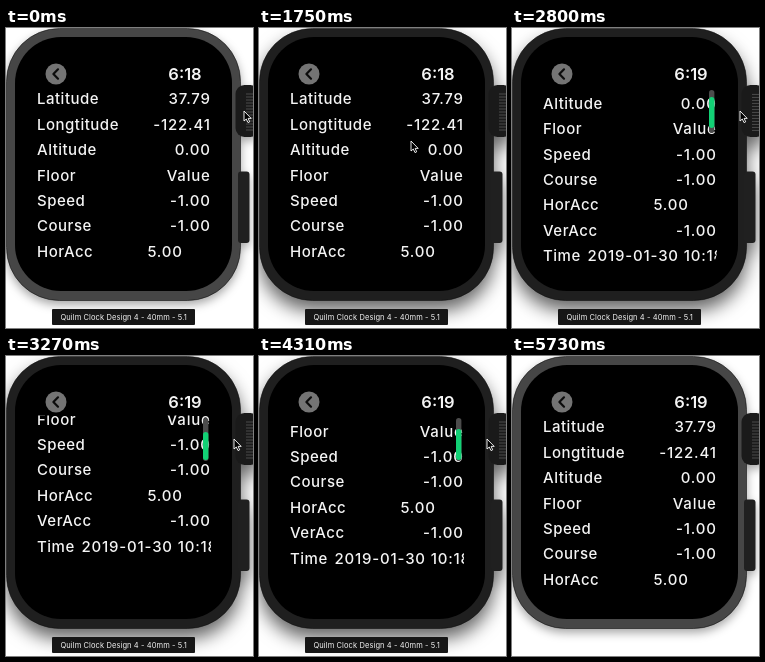
An HTML page that plays this animation: 247 by 300 pixels, repeating every 5.83 s.

```html
<!DOCTYPE html>
<html lang="en">
<head>
<meta charset="utf-8">
<title>Watch location list</title>
<style>
  html, body { margin: 0; width: 100%; height: 100%; overflow: hidden; background: #fff; }
  svg { display: block; width: 247px; height: 300px; font-family: Inter, Roboto, sans-serif; fill: #f4f4f4; }
  .rows { font-size: 15px; font-weight: 500; letter-spacing: .5px; }
  .value { letter-spacing: .8px; }
  .clock { font-size: 16.5px; font-weight: 600; }
  .tag { font-size: 7.5px; letter-spacing: .1px; }
  .end { text-anchor: end; }
  .body { --shell: #464646; filter: drop-shadow(0 4px 5px rgba(0, 0, 0, .35)); }
  .body.active { --shell: #1f1f1f; filter: drop-shadow(0 10px 9px rgba(0, 0, 0, .6)); }
  .shell { fill: var(--shell); stroke: #111; stroke-opacity: .6; }
</style>
</head>
<body>
<svg viewBox="0 0 247 300">
  <defs>
    <clipPath id="screen"><path d="M30 59.5H205V223A20 20 0 0 1 185 243H50A20 20 0 0 1 30 223Z"/></clipPath>
    <clipPath id="knob"><rect x="239" y="65" width="8" height="38"/></clipPath>
  </defs>
  <rect width="247" height="300" fill="#fff"/>
  <g id="body" class="body">
    <rect class="shell" x=".5" y=".5" width="234" height="272" rx="53"/>
    <rect x="229.5" y="57" width="24" height="52" rx="9" fill="#1a1a1a"/>
    <rect x="232" y="143.5" width="11.5" height="71.5" rx="3" fill="#202020"/>
  </g>
  <g clip-path="url(#knob)"><path id="ridges" stroke="#4a4a4a"/></g>
  <rect x="9" y="9" width="217" height="254" rx="46" fill="#000"/>

  <circle cx="50" cy="46" r="10.5" fill="#747474"/>
  <path d="M52 41.3L47.4 46L52 50.7" fill="none" stroke="#0c0c0c" stroke-width="2.2" stroke-linecap="round" stroke-linejoin="round"/>
  <text id="clock" class="clock end" x="195.7" y="52"></text>

  <g clip-path="url(#screen)"><g id="rows" class="rows"></g></g>

  <g id="bar">
    <rect x="197" y="62" width="5.4" height="43" rx="2.7" fill="#4c4c4c"/>
    <rect id="thumb" x="197" width="5.4" rx="2.7" fill="#12d175"/>
  </g>

  <g id="tag">
    <rect x="46" y="281" width="143" height="16" rx="1" fill="#161616"/>
    <text class="tag" x="117.7" y="291.7" text-anchor="middle">Quilm Clock Design 4 - 40mm - 5.1</text>
  </g>
  <path id="cursor" d="M0 0V10L2.3 8L4 11.6L5.7 10.8L4.1 7.4H7.2Z" fill="#000" stroke="#fff" stroke-width=".9"/>
</svg>
<script>
const LOOP = 5830, STEP = 150, ROW = 25.4, MAX = 72;
const $ = id => document.getElementById(id);

// Spans in which the screen refreshes, about every STEP ms
const bursts = [[1190, 2050], [2350, 3270], [3410, 4010], [4310, 5210], [5360, 5730]];
const ticks = [0];
for (const [a, b] of bursts) {
  const n = Math.round((b - a) / STEP);
  for (let i = 0; i <= n; i++) ticks.push(a + (b - a) * i / n);
}

// Eased moves: start, end, destination
const pull = [[2140, 3110, 84], [3270, 4010, MAX], [4310, 4910, -35], [4910, 5360, 0]];
const glideX = [[1060, 1245, 152], [1630, 2050, 228], [4910, 5210, 262]];
const glideY = [[1060, 1245, 113], [1630, 2050, 83]];

const clamp = (v, lo, hi) => Math.max(lo, Math.min(hi, v));
const ease = u => (1 - Math.cos(Math.PI * clamp(u, 0, 1))) / 2;
const follow = (moves, from, t) =>
  moves.reduce((v, [a, b, to]) => v + (to - v) * ease((t - a) / (b - a)), from);

const rows = [
  ['Latitude', '37.79'], ['Longtitude', '-122.41'], ['Altitude', '0.00'],
  ['Floor', 'Value'], ['Speed', '-1.00'], ['Course', '-1.00'],
  ['HorAcc', '5.00', 176.8], ['VerAcc', '-1.00'], ['Time']
];
const baseline = i => 76.4 + i * ROW;
$('rows').innerHTML = rows.map(([name, value = '', x = 204.7], i) =>
  `<text x="31" y="${baseline(i)}">${name}</text>
   <text class="value end" x="${x}" y="${baseline(i)}">${value}</text>`
).join('') + `<text class="value" x="75.5" y="${baseline(8)}">2019-01-30 10:18:42</text>`;

let ridges = '';
for (let y = 60; y < 110; y += 3) ridges += `M240 ${y}h7`;
$('ridges').setAttribute('d', ridges);

const move = (id, x, y) => $(id).setAttribute('transform', `translate(${x} ${y})`);
const show = (id, on) => $(id).setAttribute('visibility', on ? 'visible' : 'hidden');

function draw(now) {
  const time = now % LOOP;
  const t = ticks.filter(k => k <= time + .5).pop();
  const scroll = follow(pull, 0, t);
  const inside = clamp(scroll, 0, MAX);
  const squeeze = Math.min(4, Math.abs(scroll - inside) / 4);

  move('rows', 0, -scroll);
  move('ridges', 0, -(scroll / 4) % 3);
  move('cursor', follow(glideX, 238, t), follow(glideY, 83, t));
  $('thumb').setAttribute('y', 62 + 11 * inside / MAX + (scroll > MAX ? squeeze : 0));
  $('thumb').setAttribute('height', 31 - squeeze);
  $('body').classList.toggle('active', t >= 1620 && t < 5360);
  $('clock').textContent = t >= 1900 ? '6:19' : '6:18';
  show('bar', t >= 2350 && t < 5500);
  show('tag', t < 5210);
}

const start = performance.now();
function loop() {
  draw(performance.now() - start);
  requestAnimationFrame(loop);
}
loop();
</script>
</body>
</html>
```
